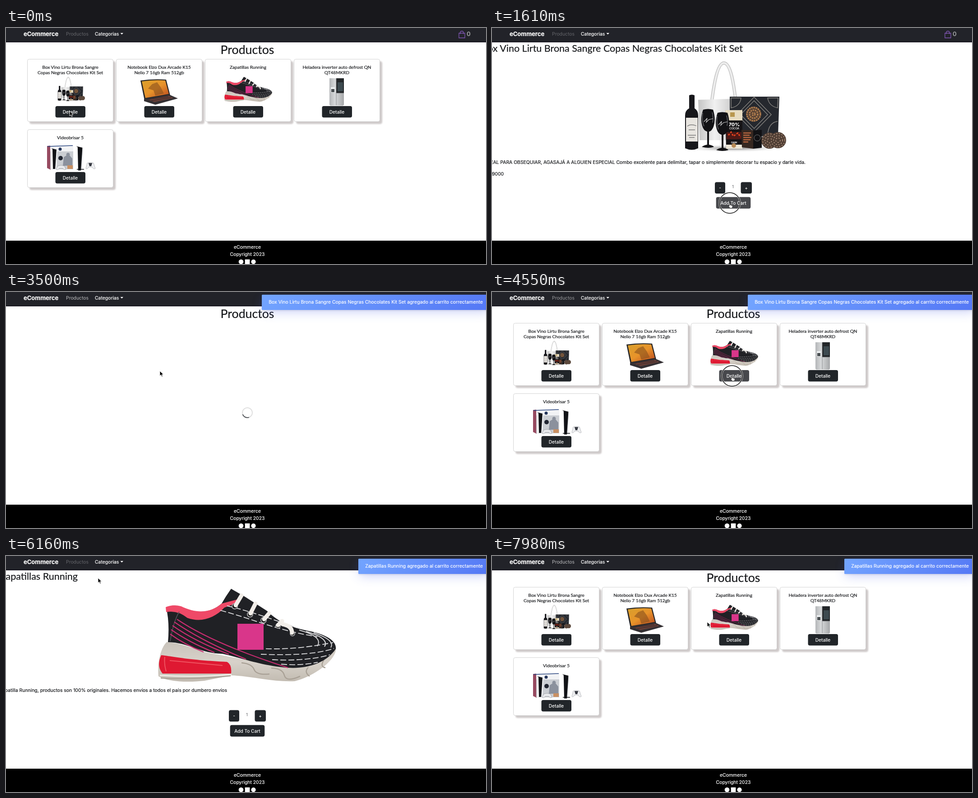
These frames come from a looping animation (1064 px wide and 526 px high, 8 s). An HTML page:

```html
<!DOCTYPE html>
<html lang="es">
<head>
<meta charset="utf-8">
<title>eCommerce</title>
<style>
  html, body { margin: 0; width: 100%; height: 100%; overflow: hidden; background: #fff; }
  svg { display: block; width: 100%; height: 100%; }
  text { font: 10.4px Inter, sans-serif; fill: #16181b; stroke: #16181b; stroke-width: .2px; }
  .mid { text-anchor: middle; }
  .end { text-anchor: end; }
  .light { fill: #fff; stroke: #fff; }
  .label { fill: #fff; stroke: none; font-weight: 500; font-size: 10.1px; text-anchor: middle; }
  .h1 { font: 26.7px Lato, sans-serif; text-anchor: middle; }
  .h2 { font: 21.5px Lato, sans-serif; text-anchor: end; }
  .name { font: 10.1px Lato, sans-serif; text-anchor: middle; }
  .btn { fill: #212529; }
  .btn.hover { fill: #47484c; }
  .card { fill: #fff; stroke: #d3d3d3; filter: drop-shadow(5px 5px 1.6px #cfcaca); }
  foreignObject { overflow: visible; }
  #toast {
    box-sizing: border-box; width: max-content; height: 34.3px; margin-left: auto; padding: 0 15px;
    font: 10.4px/34px Inter, sans-serif; color: #fff; border-radius: 1.5px;
    -webkit-text-stroke: .2px #fff;
    background: linear-gradient(135deg, #73a5ff, #5477f5);
    box-shadow: 0 2px 4px -1px rgba(0,0,0,.12), 0 7px 24px -3px rgba(77,96,232,.3);
  }
</style>
</head>
<body>
<svg viewBox="0 0 1064 526">
  <defs>
    <linearGradient id="cloth"><stop stop-color="#c4c4c4"/><stop offset=".5" stop-color="#f1f1f1"/><stop offset="1" stop-color="#cfcfcf"/></linearGradient>
    <linearGradient id="steel"><stop stop-color="#b4b6b8"/><stop offset=".4" stop-color="#d8dadb"/><stop offset="1" stop-color="#a5a7a9"/></linearGradient>
    <linearGradient id="sunset" x2="1" y2="1"><stop stop-color="#d9a02c"/><stop offset=".5" stop-color="#e8932a"/><stop offset="1" stop-color="#b8471e"/></linearGradient>
    <linearGradient id="sole" y2="1" x2="0"><stop stop-color="#c9c3bb"/><stop offset=".5" stop-color="#d8d2ca"/><stop offset="1" stop-color="#c2bbb1"/></linearGradient>
    <radialGradient id="shade"><stop stop-color="#777"/><stop offset="1" stop-color="#fff" stop-opacity="0"/></radialGradient>

    <g id="gift">
      <ellipse cx="535" cy="268" rx="118" ry="9" fill="url(#shade)"/>
      <path d="M487 165C492 125 500 78 514 78S535 118 540 160" fill="none" stroke="#b9b9b9" stroke-width="7"/>
      <path d="M487 165C492 125 500 78 514 78S535 118 540 160" fill="none" stroke="#ededed" stroke-width="4.5"/>
      <path d="M457 160L530 158V250H460Z" fill="url(#cloth)"/>
      <path d="M527 153H637L634 241H527Z" fill="#25282e"/>
      <g fill="none" stroke="#85837f" stroke-width="1.5">
        <path d="M581 154L619 193L581 232L543 193ZM581 162L611 193L581 224L551 193Z"/>
        <path d="M530 156H552Q550 174 530 178ZM634 156H611Q614 174 633 178ZM633 208Q613 211 611 238"/>
      </g>
      <circle cx="580" cy="192" r="17" fill="#5d4636"/>
      <g fill="none" stroke="#b98350" stroke-width="3" stroke-dasharray="3 2"><circle cx="580" cy="192" r="15"/><circle cx="580" cy="192" r="9"/><circle cx="580" cy="192" r="3"/></g>
      <path d="M437 150Q443 147 449 150V179Q457 184 457 195V268Q443 275 428 268V195Q428 184 437 179Z" fill="#17171b"/>
      <path d="M430 200H456V253H430Z" fill="#e8e5e0"/>
      <path d="M433 219Q440 213 453 218M436 227H450M434 239H452M437 244H449" fill="none" stroke="#777" stroke-width="1.3"/>
      <g id="glass">
        <path d="M468 182Q479 179 490 182Q497 204 491 220Q487 230 481 231V260Q490 262 492 265Q480 269 465 265Q470 261 477 260V231Q469 229 466 218Q461 202 468 182Z" fill="#121215"/>
        <path d="M467 189Q465 207 470 219M488 188Q491 199 489 211" fill="none" stroke="#77777c" stroke-width="1.2"/>
        <path d="M470 209L477 201L475 210L481 204L490 202" fill="none" stroke="#ccc" stroke-width="1.2"/>
      </g>
      <path d="M517 183H555V269H519Z" fill="#161416"/>
      <path d="M517 183H555V206H518Z" fill="#e7dcc2"/>
      <rect x="528" y="188" width="10" height="10" fill="#b9974f"/>
      <path d="M520 232H553V248H520Z" fill="#4d1916"/>
      <path d="M524 239L530 232L535 241L545 234L551 243" fill="none" stroke="#e4421e" stroke-width="3" stroke-dasharray="4 3"/>
      <text class="mid light" x="537" y="219" style="font-size:11px;font-weight:700">70%</text>
      <text class="mid light" x="537" y="226" style="font-size:6px">COCOA</text>
      <text class="mid light" x="537" y="257" style="font-size:5px">DARK</text>
      <path d="M519 260H555V269H519Z" fill="#ece6d7"/><circle cx="536" cy="262" r="5" fill="#b88a56"/>
      <use href="#glass" x="32" y="7"/>
      <path d="M553 227L579 228V269L554 266Z" fill="#362821"/><path d="M579 228L598 227V267L579 269Z" fill="#111114"/>
      <path d="M557 234H574M557 239H571M557 244H575M557 249H573M557 254H568" stroke="#ba6741" stroke-width="2.3"/>
      <circle cx="588" cy="245" r="7" fill="none" stroke="#777"/>
      <g id="cookie"><circle cx="615" cy="251" r="18" fill="#4f3e34"/><g fill="none" stroke="#a18370" stroke-width="2" stroke-dasharray="3 3"><circle cx="615" cy="251" r="15"/><circle cx="615" cy="251" r="10"/><circle cx="615" cy="251" r="5"/></g></g>
      <use href="#cookie" x="19" y="-1"/>
    </g>

    <g id="shoe">
      <path d="M356 192C342 206 335 240 338 268C360 281 405 282 440 278L500 266C548 268 590 281 640 279C684 268 735 230 731 204L620 248L440 214Q380 192 356 192Z" fill="url(#sole)"/>
      <path d="M341 266Q420 271 500 264" fill="none" stroke="#f0ece6" stroke-width="3"/>
      <path d="M343 272Q420 276 498 267M522 238Q545 240 550 253T584 263M588 250Q613 250 617 266T652 268M670 248Q660 259 673 268M705 231Q695 247 708 249" fill="none" stroke="#a9a196" stroke-width="2.5"/>
      <path d="M355 115Q370 107 388 113C425 131 455 126 478 106Q487 90 499 73L530 91L578 122C608 151 635 160 680 169C712 177 733 190 731 207C709 240 665 252 624 249C565 244 525 228 480 218C430 217 405 193 359 192Q363 148 355 115Z" fill="#202125"/>
      <path d="M354 114Q370 107 388 112C425 130 455 126 478 106L512 97L511 105L484 115C462 139 432 149 402 138Q380 120 355 125Z" fill="#ef4967"/>
      <path d="M384 124Q371 146 364 190" fill="none" stroke="#55565b" stroke-width="1.5"/>
      <g fill="none" stroke="#c92c70" stroke-width="2.2">
        <path d="M364 174Q395 197 438 214M366 164Q405 192 462 215M369 155Q420 191 494 219M373 147Q435 190 532 230M379 141Q460 196 625 249"/>
      </g>
      <g fill="none" stroke="#dfdfe1" stroke-width="1.8" stroke-dasharray="13 5">
        <path d="M475 121C550 141 594 164 690 180M490 111C550 125 599 145 650 161M540 204C610 211 660 205 725 193M565 219C620 221 681 221 727 206M590 231C640 234 690 229 718 220M610 241Q650 245 691 237"/>
      </g>
      <path d="M650 165Q704 180 690 201M665 168Q718 184 706 202M682 171Q730 187 720 204" fill="none" stroke="#d5d5d7" stroke-width="2"/>
      <rect x="513" y="151" width="58" height="58" fill="#d9368a"/>
      <g fill="#111" stroke="#a6a6a8" stroke-width="2"><circle cx="507" cy="112" r="6"/><circle cx="541" cy="130" r="6"/><circle cx="571" cy="143" r="6"/><circle cx="603" cy="156" r="5"/><circle cx="635" cy="173" r="5"/></g>
      <path d="M522 88L509 110M553 106L542 128M583 128L572 141M612 145L603 154M613 152Q634 156 634 171" fill="none" stroke="#f2eee9" stroke-width="9" stroke-linecap="round"/>
      <path d="M344 221C372 224 405 232 490 236Q501 242 499 262L347 262Q333 245 344 221Z" fill="#df1932"/>
      <path d="M352 225Q350 240 355 257M363 233L480 244" fill="none" stroke="#f05562" stroke-width="2"/>
    </g>

    <g id="laptop">
      <path d="M298 117Q325 113 355 115L364 150L307 161Z" fill="#292829"/>
      <path d="M301 119Q328 115 353 117L361 147L309 156Z" fill="url(#sunset)"/>
      <path d="M324 125L335 121L343 132L350 146L331 151L327 139L315 135Z" fill="#89501d" opacity=".6"/>
      <path d="M306 158L363 149L381 157L331 171L306 163Z" fill="#343033"/>
      <path d="M314 159L360 151L371 156L329 165Z" fill="#6b4038"/>
      <path d="M316 159L360 153M322 162L366 155" stroke="#242225"/>
    </g>

    <g id="fridge">
      <path d="M717 112H749V171L747 173H719L717 171Z" fill="url(#steel)"/>
      <path d="M732 112H749V145H732Z" fill="#232629"/>
      <path d="M735 121H747V141H735Z" fill="#3d4a50"/>
      <path d="M732 112V172M733 145H749" stroke="#77797b" stroke-width=".8"/>
      <rect x="720" y="132" width="9" height="12" fill="#edf0f1"/><rect x="721" y="136" width="7" height="7" fill="#4b5053"/>
    </g>

    <g id="console">
      <path d="M91 263L99 262V316L91 312Z" fill="#974a60"/>
      <path d="M98 262H149V315H98Z" fill="#cbced3"/>
      <path d="M98 262H149V275H98Z" fill="#f2f3f5"/><path d="M92 264L148 262" stroke="#26427d" stroke-width="1.3"/>
      <circle cx="120" cy="270" r="3.5" fill="#25365b"/>
      <g id="tower"><path d="M100 268L112 271L111 314L102 314Z" fill="#111216"/><path d="M99 267L103 270L104 314L100 315Z" fill="#fff"/><path d="M112 270L114 272L112 314L109 315Z" fill="#f0f1f3"/></g>
      <path d="M126 307L128 288L134 284A4 4 0 1 1 141 284L147 291V307Z" fill="#8b919d"/>
      <circle cx="121" cy="290" r="5" fill="#222632"/>
      <rect x="136" y="306" width="12" height="8" fill="#c99063"/>
      <path d="M114 308Q122 304 130 308L133 315Q129 318 126 313H118Q115 318 111 315Z" fill="#e7e8eb" stroke="#8c8e94" stroke-width=".7"/>
      <use href="#tower" transform="translate(35.2 -53) scale(1.2 1.18)"/>
      <path d="M157 315H173" stroke="#15171a" stroke-width="1.5"/>
      <path d="M180 301Q187 298 194 301L198 313Q194 316 191 310H183Q180 316 177 313Z" fill="#eeeff1" stroke="#a1a3a7" stroke-width=".7"/>
      <path d="M183 301H191L189 308H185Z" fill="#373a42"/>
    </g>
  </defs>

  <rect width="1064" height="526" fill="#fff"/>
  <g class="view" id="list"></g>
  <text class="h1" id="heading" x="535" y="58">Productos</text>
  <g class="view" id="detail">
    <use id="photo"/>
    <text class="h2" id="title" y="53"/>
    <text class="end" id="about" y="303"/>
    <text class="end" id="price" x="26" y="329">$9000</text>
    <rect class="btn" x="494" y="343.5" width="23" height="25.5" rx="4"/><text class="label" x="505.5" y="360">-</text>
    <text class="mid" x="534" y="356.5" style="font-size:9px;fill:#55585c;stroke:none">1</text>
    <rect class="btn" x="551.5" y="343.5" width="24.5" height="25.5" rx="4"/><text class="label" x="563.7" y="360">+</text>
    <rect class="btn" x="496.7" y="376.7" width="76.6" height="25.8" rx="4"/><text class="label" x="535" y="393.5">Add To Cart</text>
  </g>
  <g id="spinner" fill="none" stroke-width="2"><circle cx="535" cy="269" r="11" stroke="#e0e0e0"/><path id="arc" d="M527.2 276.8A11 11 0 0 0 542.8 276.8" stroke="#55585c"/></g>

  <rect width="1064" height="32" fill="#222329"/><rect y="30.5" width="1064" height="1.5" fill="#17141f"/>
  <text class="light" x="39" y="17.5" style="font-size:13px;font-weight:700">eCommerce</text>
  <text id="link" x="133" y="17" style="stroke:none">Productos</text>
  <text class="light" x="197" y="17">Categorias</text><path d="M253.5 11H260L256.7 14.5Z" fill="#fff"/>
  <path id="bag" d="M1004 11.5H1017V22H1004ZM1007 13.5V10Q1007 7 1010.5 7T1014 10V13.5" fill="none" stroke="#8156b5" stroke-width="1.3"/>
  <text class="end" id="count" x="1030" y="18" style="font-size:13.5px;font-weight:600;fill:#a2a3a6;stroke:none"/>

  <rect y="474" width="1064" height="52"/>
  <text class="mid light" x="535" y="491.5">eCommerce</text>
  <text class="mid light" x="535" y="507.5">Copyright 2023</text>
  <g fill="#fff"><circle cx="521" cy="521" r="5.3"/><rect x="529.7" y="515.7" width="10.6" height="10.6"/><circle cx="548.5" cy="521" r="5.1"/></g>

  <foreignObject id="toastBox" width="1072" height="50"><div id="toast"></div></foreignObject>
  <g id="ring" fill="none"><circle r="23" stroke="#fff" stroke-opacity=".65" stroke-width="3.6"/><circle r="23" stroke="#111" stroke-width="1.5"/></g>
  <g id="cursor" stroke="#fff" stroke-width=".9">
    <path id="arrow" d="M0 0V11L2.6 8.6L4.4 12.8L6.3 12L4.5 8H8Z" fill="#000"/>
    <path id="hand" d="M-1 1C-1-.7 1-.7 1 1V4.5L5 5.4Q6.6 6 6.3 7.6L5.5 11.5H.6L-2.6 7.2Q-2.5 5.4-1 6.6Z" fill="#fff" stroke="#222"/>
  </g>
</svg>
<script>
const $ = id => document.getElementById(id);
const show = (id, on) => { $(id).style.display = on ? '' : 'none'; };
const LOOP = 8000, STEP = 70;
const GIFT = 'Box Vino Lirtu Brona Sangre Copas Negras Chocolates Kit Set';
const RUNNING = 'Zapatillas Running';

const small = (id, x) => `<use href="#${id}" transform="translate(${x} 136.5) scale(.269) translate(-535 -176.5)"/>`;
const card = (x, y, height, lines, picture) => {
  const mid = x + 95.5, bottom = y + height;
  return `<rect class="card" x="${x + .5}" y="${y + .5}" width="190" height="${height - 1}" rx="4"/>
    ${lines.map((line, i) => `<text class="name" x="${mid}" y="${y + 21.5 + 12 * i}">${line}</text>`).join('')}
    ${picture}
    <rect class="btn" x="${mid - 33}" y="${bottom - 35}" width="66.5" height="25.5" rx="4"/>
    <text class="label" x="${mid}" y="${bottom - 18.5}">Detalle</text>`;
};
$('list').innerHTML =
  card(47, 69, 140, ['Box Vino Lirtu Brona Sangre', 'Copas Negras Chocolates Kit Set'], small('gift', 143.5)) +
  card(244, 69, 140, ['Notebook Elzo Dux Arcade K15', 'Nelio 7 16gb Ram 512gb'], '<use href="#laptop"/>') +
  card(441, 69, 140, [RUNNING], small('shoe', 537)) +
  card(638, 69, 140, ['Heladera inverter auto defrost QN', 'QT48MKRD'], '<use href="#fridge"/>') +
  card(47, 226, 130, ['Videobrisar 5'], '<use href="#console"/>');

const products = {
  gift: { title: GIFT, titleEnd: 556, aboutEnd: 695,
    about: 'IDEAL PARA OBSEQUIAR, AGASAJÁ A ALGUIEN ESPECIAL Combo excelente para delimitar, tapar o simplemente decorar tu espacio y darle vida.' },
  shoe: { title: RUNNING, titleEnd: 159, aboutEnd: 490,
    about: 'Zapatilla Running, productos son 100% originales. Hacemos envíos a todos el país por dumbero envíos' }
};

// [start, value] pairs; the last one started is current
const views = [[0, 'list'], [490, 'wait'], [630, 'gift'], [3010, 'load'], [3570, 'list'],
  [4760, 'wait'], [4900, 'shoe'], [7070, 'load'], [7350, 'list']];
const linkColors = [[0, '#65666b'], [2700, '#bcbdbf'], [3850, '#98999c'], [4760, '#65666b'], [6580, '#bcbdbf']];
const at = (track, t) => track.filter(([start]) => start <= t).pop()[1];

const clicks = [[210, 490], [1540, 1820], [2800, 3010], [4480, 4760], [5460, 5740], [6720, 7070]];
const path = [[0, 141, 185], [840, 141, 185], [1400, 525, 405], [1540, 527, 390], [1820, 527, 390],
  [1960, 530, 394], [2520, 262, 112], [2730, 157, 13], [3010, 157, 13], [3430, 336, 169], [3500, 341, 176],
  [3640, 344, 180], [3780, 344, 180], [4410, 530, 185], [4480, 532, 187], [4760, 532, 187], [5180, 560, 404],
  [5320, 563, 411], [5460, 540, 391], [5740, 540, 391], [6160, 204, 49], [6300, 187, 44], [6370, 185, 42],
  [6580, 157, 13], [7070, 157, 13], [7700, 463, 122], [7980, 477, 147], [LOOP, 477, 147]];
const buttons = [...document.querySelectorAll('.btn')];

function pointer(t) {
  const i = path.findIndex(([time]) => time > t);
  const [t0, x0, y0] = path[i - 1], [t1, x1, y1] = path[i];
  const k = (t - t0) / (t1 - t0);
  return [x0 + (x1 - x0) * k, y0 + (y1 - y0) * k];
}

function drawToast(t) {
  const first = t < 5500;
  const easeOut = k => 1 - (1 - Math.min(1, Math.max(0, k))) ** 3;
  const shown = first ? easeOut((t - 1820) / 400) - easeOut((t - 4900) / 400) : easeOut((t - 5740) / 400);
  $('toast').textContent = `${first ? GIFT : RUNNING} agregado al carrito correctamente`;
  $('toastBox').setAttribute('y', 6.2 - 110 * (1 - shown));
  $('toastBox').setAttribute('opacity', shown);
}

function drawPage(t) {
  const view = at(views, t), product = products[view];
  show('list', view === 'list');
  show('heading', view === 'list' || view === 'load');
  show('spinner', view === 'wait' || view === 'load');
  show('detail', product);
  show('price', view === 'gift');
  if (product) {
    $('photo').setAttribute('href', '#' + view);
    $('title').textContent = product.title;
    $('title').setAttribute('x', product.titleEnd);
    $('about').textContent = product.about;
    $('about').setAttribute('x', product.aboutEnd);
  }
  $('arc').setAttribute('transform', `rotate(${(t - 3500) * .36 + 25} 535 269)`);
  $('link').style.fill = at(linkColors, t);
  const count = t < 1890 ? 0 : 1;
  $('count').textContent = count;
  $('bag').setAttribute('transform', `translate(${count * 2.5})`);
}

function drawPointer(t) {
  const [x, y] = pointer(t);
  let hand = y < 24 && x > 132 && x < 184;
  for (const button of buttons) {
    const dx = x - button.getAttribute('x'), dy = y - button.getAttribute('y');
    const hover = t >= 210 && button.closest('.view').style.display !== 'none' &&
      dx > 0 && dy > 0 && dx < button.getAttribute('width') && dy < button.getAttribute('height');
    button.classList.toggle('hover', hover);
    hand ||= hover;
  }
  show('hand', hand);
  show('arrow', !hand);
  show('ring', clicks.some(([from, to]) => t >= from && t < to));
  for (const id of ['cursor', 'ring']) $(id).setAttribute('transform', `translate(${x} ${y})`);
}

const start = performance.now();
function frame() {
  const t = Math.floor((performance.now() - start) % LOOP / STEP) * STEP;
  drawPage(t);
  drawToast(t);
  drawPointer(t);
  requestAnimationFrame(frame);
}
frame();
</script>
</body>
</html>
```
